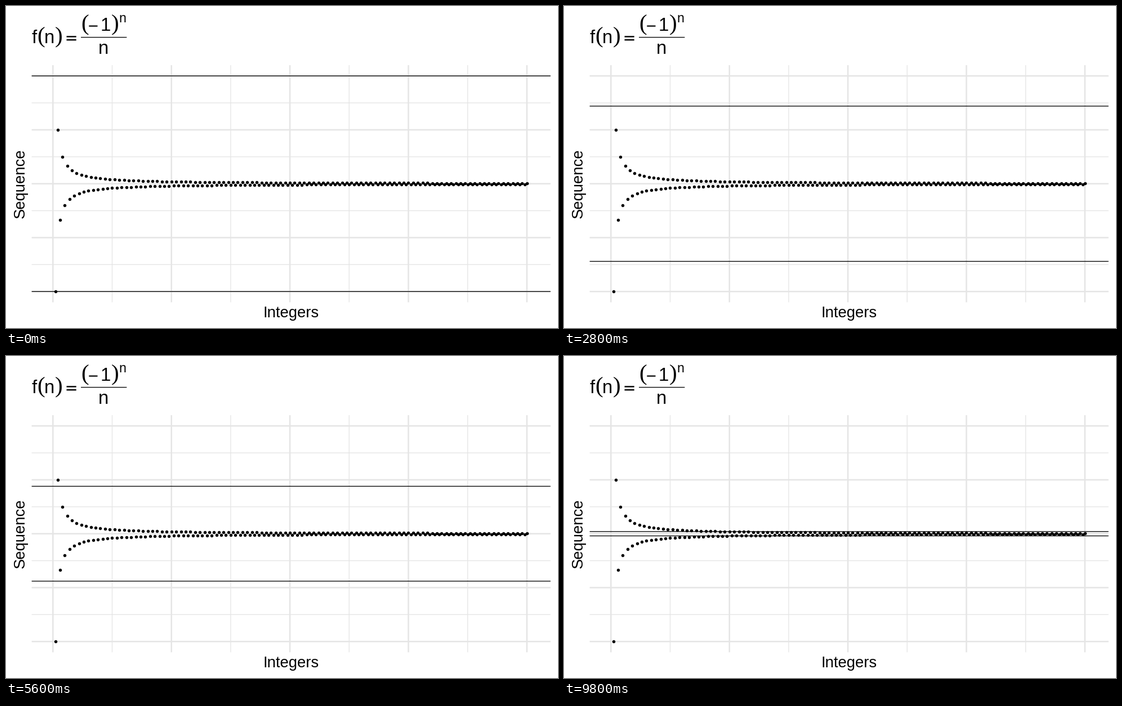
These frames come from a looping animation (980 by 572 pixels, 10000 ms). A matplotlib script:

```python
import numpy as np
import matplotlib.pyplot as plt
from matplotlib.animation import FuncAnimation

W, H, DPI = 980, 572, 100
PT = 72 / DPI                      # points per pixel
FRAMES, STEP = 50, 200

X0, DX = 83.3, 4.2075              # pixel of n = 0, pixels per integer
Y0, DY = 315.7, 191.5              # pixel of value 0, pixels per unit
LEFT, RIGHT, TOP, BOTTOM = 45.6, 966.7, 105.1, 526.3
GRID = "#E5E5E5"
SANS, SERIF = "Liberation Sans", "Liberation Serif"

fig = plt.figure(figsize=(W / DPI, H / DPI), dpi=DPI, facecolor="white")
ax = fig.add_axes([0, 0, 1, 1])
ax.set_xlim(0, W)
ax.set_ylim(H, 0)
ax.axis("off")


def line(xs, ys, width, color="black", z=1):
    (art,) = ax.plot(xs, ys, color=color, lw=width * PT, zorder=z,
                     solid_capstyle="butt", snap=False)
    return art


def text(x, y, s, size, font=SANS, ha="left", angle=0):
    ax.text(x, y, s, fontsize=size * PT, family=font, ha=ha, va="baseline",
            rotation=angle, rotation_mode="anchor", color="black")


def paren(x, mid, s, size=41.25):
    text(x, mid + 0.25 * size, s, size, SERIF)


def draw_grid():
    for minor in (True, False):
        width = 1.33 if minor else 2.5
        start = 1 if minor else 0
        for i in range(start, 9, 2):
            x = X0 + 25 * i * DX
            y = Y0 + (i / 4 - 1) * DY
            if i < 9:
                line([x, x], [TOP, BOTTOM], width, GRID, 1 if minor else 2)
                line([LEFT, RIGHT], [y, y], width, GRID, 1 if minor else 2)


def draw_formula(size=33):
    text(45.5, 66, "f", size)
    paren(54.9, 55.5, "(")
    text(68.2, 66, "n", size)
    paren(86.6, 55.5, ")")
    for y in (54.4, 60.2):
        line([107.5, 124.7], [y, y], 2.4)
    line([133, 214.3], [55.6, 55.6], 1.33)
    paren(132.8, 33, "(")
    line([147.3, 162.5], [35.6, 35.6], 2.2)
    text(167.6, 44, "1", size)
    paren(186.3, 33, ")")
    text(200.5, 29.3, "n", 0.7 * size)
    text(173.2, 85.3, "n", size, ha="center")


draw_grid()
draw_formula()
text(505.8, 552.6, "Integers", 27.5, ha="center")
text(32.8, Y0, "Sequence", 27.5, ha="center", angle=90)

n = np.arange(1, 201)
ax.scatter(X0 + n * DX, Y0 - (-1.0) ** n / n * DY, s=(5.5 * PT) ** 2,
           color="black", linewidths=0, zorder=4)

upper = line([LEFT, RIGHT], [Y0 - DY] * 2, 1.33, z=5)
lower = line([LEFT, RIGHT], [Y0 + DY] * 2, 1.33, z=5)


def update(k):
    eps = 1 - k / FRAMES
    upper.set_ydata([Y0 - eps * DY] * 2)
    lower.set_ydata([Y0 + eps * DY] * 2)
    return upper, lower


anim = FuncAnimation(fig, update, frames=FRAMES, interval=STEP,
                     repeat=True, repeat_delay=0, blit=False)
plt.show()
```
